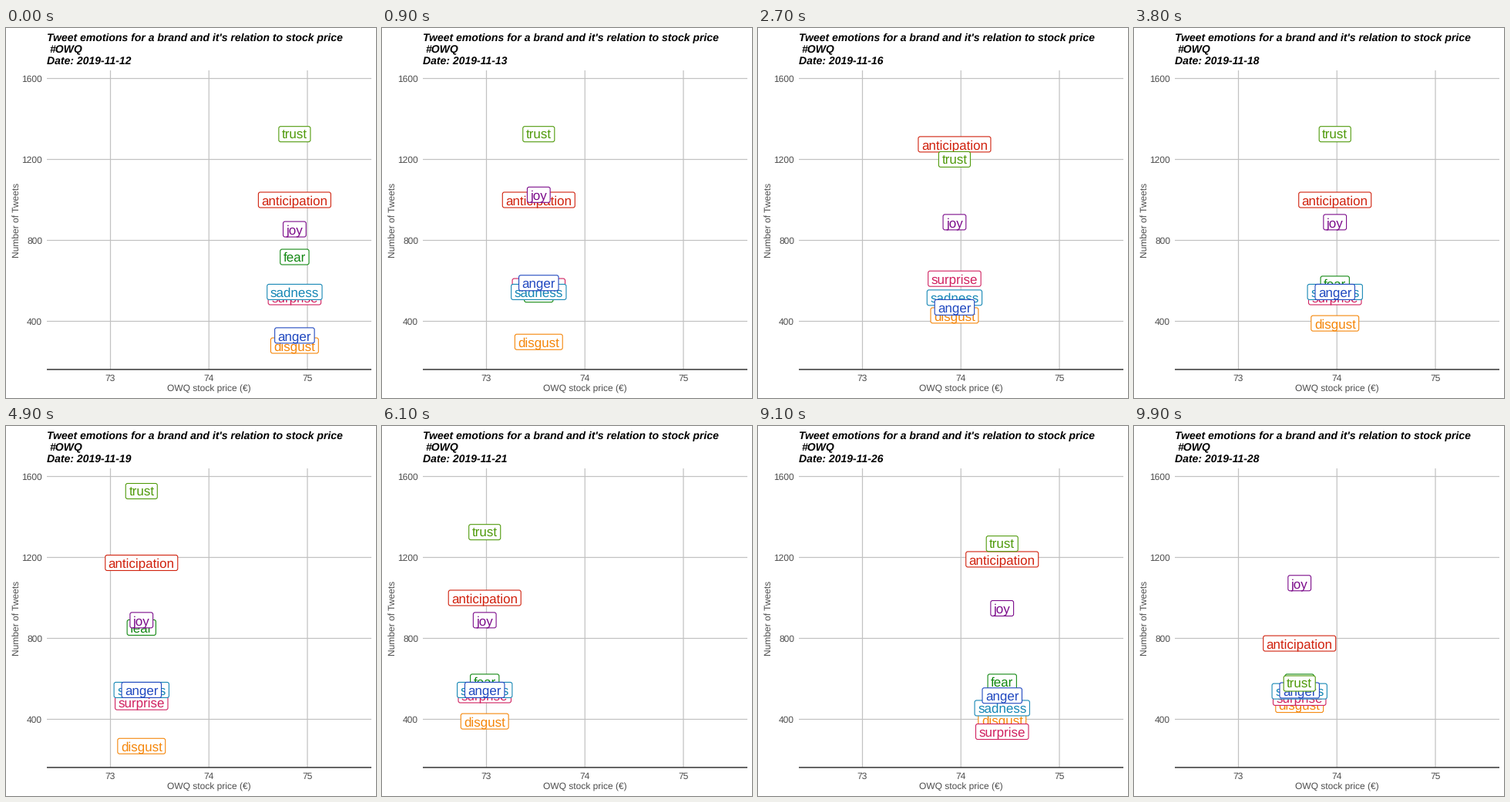
Recreate the animation shown at these times as a matplotlib script. Size 480 by 480 pixels, loop 10000 ms.

```python
import matplotlib.pyplot as plt
import numpy as np
from matplotlib.animation import FuncAnimation
from matplotlib.patches import FancyBboxPatch

plt.rcParams["font.family"] = "Liberation Sans"
plt.rcParams["text.hinting"] = "none"
SIZE, FRAMES, SPAN = 480, 100, 16
GREY = "#4d4d4d"
BURST = 1.4  # days a burst takes to build up, and to fade

# Turning points of the price: day, euros.
PRICE = [(0, 74.87), (1.45, 73.53), (4.4, 73.94), (7, 74.0),
         (9, 72.51), (14, 75.26), (15, 74.07), (16, 73.62)]

# Usual tweet count and the bursts around it (day: size), back to front.
EMOTIONS = {
    "fear": ("#118811", 585, {0: 133, 1.5: -54, 4.4: -118, 8: 285}),
    "disgust": ("#f5860a", 390, {0: -110, 1.5: -95, 4.4: 40, 8: -130, 16: 82}),
    "surprise": ("#d0205f", 520, {1.5: 55, 4.4: 93, 8: -37, 14.7: -182}),
    "sadness": ("#1587b5", 545, {4.4: -29, 12: 106, 14.7: -90}),
    "anger": ("#2048c0", 545, {0: -215, 1.5: 46, 4.4: -78, 14.7: -28}),
    "anticipation": ("#d0200c", 1000, {4.4: 282, 8: 184, 14.7: 210, 16: -240}),
    "joy": ("#7b0a8a", 890, {0: -35, 1.5: 140, 12: -328, 14.7: 45, 16: 180}),
    "trust": ("#4f9a0a", 1325, {4.4: -128, 8: 215, 12: -264, 16: -748}),
}


def px(price):
    return 135.5 + (price - 73) * 127.75


def py(count):
    return 380.5 - (count - 400) * 105 / 400


fig = plt.figure(figsize=(SIZE / 72, SIZE / 72), dpi=72, facecolor="white")
ax = fig.add_axes([0, 0, 1, 1])
ax.set(xlim=(0, SIZE), ylim=(SIZE, 0))
ax.axis("off")


def write(x, y, s, size=12, color=GREY, **kw):
    return ax.text(x, y, s, fontsize=size, color=color, **kw)


def line(xs, ys, color="#c1c1c1", width=1.2):
    ax.plot(xs, ys, color=color, lw=width, solid_capstyle="butt",
            snap=False, zorder=1)


for price in (73, 74, 75):
    line([px(price)] * 2, [55, 443])
    write(px(price), 458, str(price), ha="center")
for count in range(400, 1601, 400):
    line([53, 474], [py(count)] * 2)
    write(47, py(count) + 4.5, str(count), ha="right")
line([53, 474], [443, 443], "#333333", 1.5)

write(263, 472, "OWQ stock price (€)", ha="center")
write(19, 249.5, "Number of Tweets", ha="right", va="center", rotation=90)
bold = dict(size=14, color="black", weight="bold", style="italic")
write(53, 17, "Tweet emotions for a brand and it's relation to stock price",
      **bold)
write(57, 32, "#OWQ", **bold)
date = write(53, 47, "", **bold)


class Label:
    """Rounded white tag with a word, centred on a point."""

    def __init__(self, word, color, level, bursts, z):
        self.level, self.bursts = level, bursts
        self.text = write(0, 0, word, 17, color, ha="center", zorder=z + 0.5)
        self.w, self.h = self.text.get_window_extent().width + 8, 20
        self.box = FancyBboxPatch(
            (0, 0), self.w, self.h, boxstyle="round,pad=0,rounding_size=2.5",
            fc="white", ec=color, lw=1.1, zorder=z)
        ax.add_patch(self.box)

    def count(self, day):
        return self.level + sum(size * max(0, 1 - abs(day - peak) / BURST)
                                for peak, size in self.bursts.items())

    def place(self, x, y):
        self.box.set_bounds(x - self.w / 2, y - self.h / 2, self.w, self.h)
        self.text.set_position((x, y + 6.2))


labels = [Label(word, *spec, z)
          for z, (word, spec) in enumerate(EMOTIONS.items(), 10)]


def update(i):
    day = SPAN * i / (FRAMES - 1)
    date.set_text(f"Date: 2019-11-{12 + int(day)}")
    x = px(np.interp(day, *zip(*PRICE)))
    for label in labels:
        label.place(x, py(label.count(day)))
    return []


anim = FuncAnimation(fig, update, frames=FRAMES, interval=100,
                     repeat=True, repeat_delay=0, blit=False)
plt.show()
```
